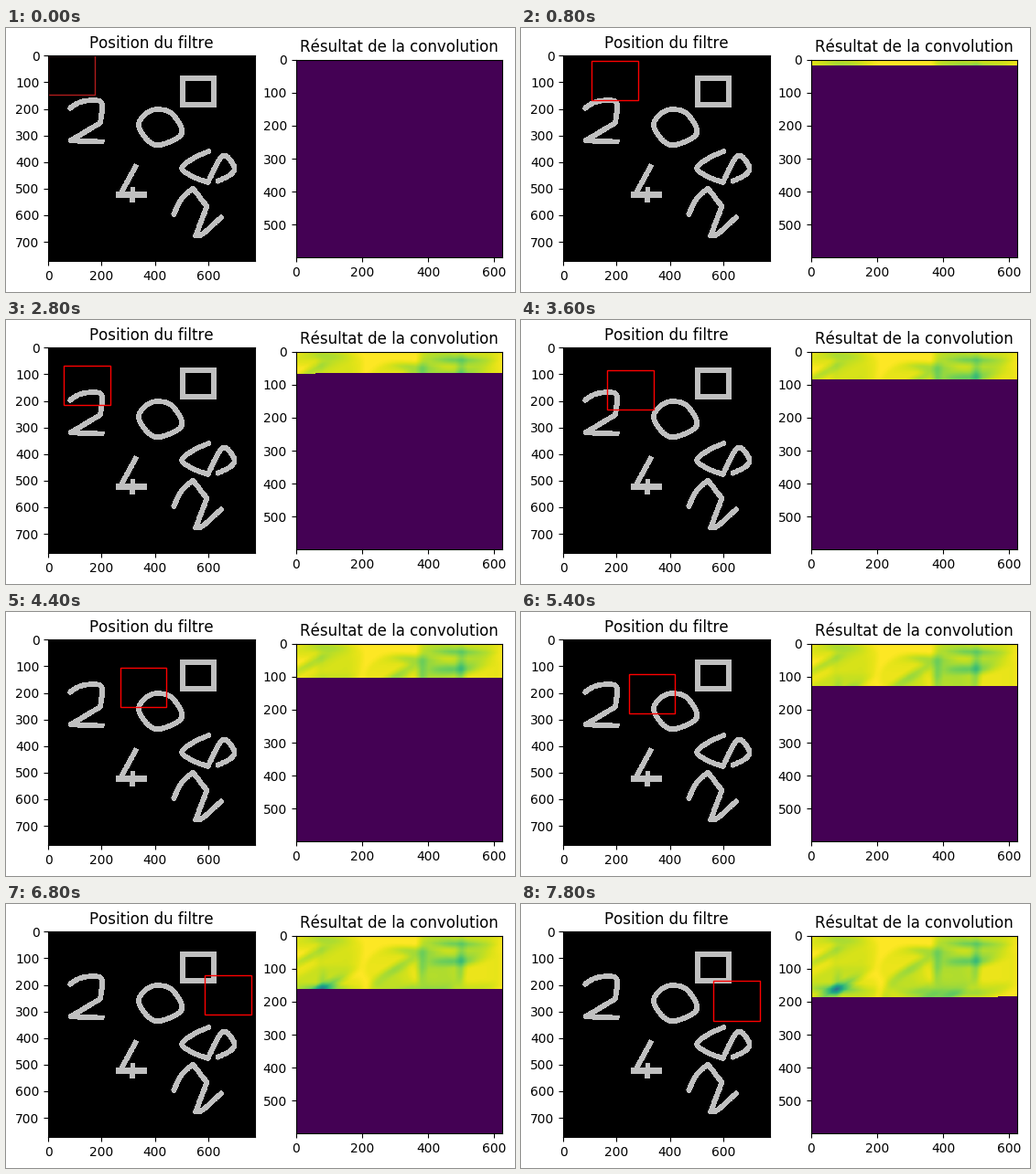
These frames come from a looping animation (556x289 px, 8 s). A matplotlib script:

```python
import numpy as np
import matplotlib.pyplot as plt
from matplotlib.animation import FuncAnimation
from matplotlib.patches import Rectangle

plt.rcParams["text.kerning_factor"] = 6
plt.rcParams["image.interpolation"] = "nearest"

DPI, STAGE_W, STAGE_H = 100, 556, 289
AX_W = 225.45                  # width of both plots in pixels
MID_Y = 142.82                 # their shared centre line
IMG_W, IMG_H = 775, 774        # scanned picture
OUT_W, OUT_H = 626, 600        # convolution result
FILT_W, FILT_H = 148, 174
STEP = 3000                    # filter positions per frame
FRAMES = 40
INK = 192
PEN = 10                       # half the pen width
PEAK = 0.64                    # drop of the score at a perfect match


def spline(points, closed=False, n=10):
    """Catmull-Rom curve through a few key points."""
    p = np.array(points, float)
    p = np.vstack([p[-1:], p, p[:2]] if closed else [p[:1], p, p[-1:]])
    t = np.linspace(0, 1, n)[:, None]
    return np.vstack([
        b + t * (c - a) / 2 + t**2 * (a - 2.5 * b + 2 * c - d / 2)
        + t**3 * (1.5 * (b - c) + (d - a) / 2)
        for a, b, c, d in zip(p, p[1:], p[2:], p[3:])])


def draw(*curves):
    """Pen line along joined curves: flat ends, round joints."""
    pts = np.vstack(curves)
    for k, (a, b) in enumerate(zip(pts[:-1], pts[1:])):
        length = np.hypot(*(b - a))
        if length == 0:
            continue
        ux, uy = (b - a) / length
        dx, dy = xx - a[0], yy - a[1]
        along, across = dx * ux + dy * uy, dx * uy - dy * ux
        mask[(along >= 0) & (along <= length) & (abs(across) <= PEN)] = True
        if k:
            mask[dx**2 + dy**2 <= PEN**2] = True


def correlate(image, kernel):
    """Valid cross-correlation by FFT, scaled to a maximum of 1."""
    spec = np.fft.rfft2(image) * np.conj(np.fft.rfft2(kernel, image.shape))
    corr = np.fft.irfft2(spec, image.shape)[:OUT_H, :OUT_W]
    return np.clip(corr / corr.max(), 0, 1)


def add_plot(left, data, title, **style):
    rows, cols = data.shape
    height = AX_W * rows / cols
    ax = fig.add_axes([left / STAGE_W,
                       1 - (MID_Y + height / 2) / STAGE_H,
                       AX_W / STAGE_W, height / STAGE_H])
    ax.set_title(title, fontsize=12)
    image = ax.imshow(data, aspect="auto", **style)
    ax.set_xticks(range(0, cols, 200))
    ax.set_yticks(range(0, rows, 100))
    return ax, image


yy, xx = np.mgrid[:IMG_H, :IMG_W].astype(np.float32)
mask = np.zeros((IMG_H, IMG_W), bool)

# two
draw(spline([(80, 202), (118, 179), (172, 171), (201, 186), (195, 256)]),
     [(84, 322), (210, 327)])
# zero
draw(spline([(410, 205), (464, 222), (502, 288), (460, 325), (392, 336),
             (339, 270), (365, 222)], closed=True))
# square
half_w, half_h = 59, 49
for s in (-1, 1):
    x, y = 562 + s * half_w, 139 + s * half_h
    draw([(562 - half_w - PEN, y), (562 + half_w + PEN, y)])
    draw([(x, 139 - half_h), (x, 139 + half_h)])
# four
draw([(331, 412), (269, 526)])
draw([(254, 525), (368, 525)])
draw([(317, 495), (314, 555)])
# five
draw(spline([(605, 361), (545, 388), (501, 425), (540, 457), (598, 479)]),
     spline([(598, 479), (652, 380), (694, 414), (688, 446), (632, 476)]))
# slanted two
draw(spline([(469, 602), (498, 543), (542, 501)]),
     [(594, 569)],
     spline([(552, 679), (580, 671), (652, 606)]))

ink = mask.astype(float)
score = 1 - PEAK * correlate(ink, ink[163:163 + FILT_H, 77:77 + FILT_W])

fig = plt.figure(figsize=((STAGE_W + 1e-3) / DPI, (STAGE_H + 1e-3) / DPI),
                 dpi=DPI, facecolor="white")
ax_in, _ = add_plot(46.12, ink * INK, "Position du filtre",
                    cmap="gray", vmin=0, vmax=255)
_, result = add_plot(316.7, np.zeros((OUT_H, OUT_W)),
                     "Résultat de la convolution",
                     cmap="viridis", vmin=0, vmax=1)
window = ax_in.add_patch(Rectangle((0, 0), FILT_H, FILT_W, lw=1,
                                   edgecolor="red", facecolor="none"))


def update(i):
    done = i * STEP
    y, x = divmod(done, OUT_W)
    window.set_xy((x, y))
    window.set_edgecolor("red" if i else "#b01c1c")
    filled = np.zeros(OUT_H * OUT_W)
    filled[:done] = score.ravel()[:done]
    result.set_data(filled.reshape(OUT_H, OUT_W))
    return window, result


anim = FuncAnimation(fig, update, frames=FRAMES, interval=1000 // 5,
                     repeat=True, repeat_delay=0)
plt.show()
```
